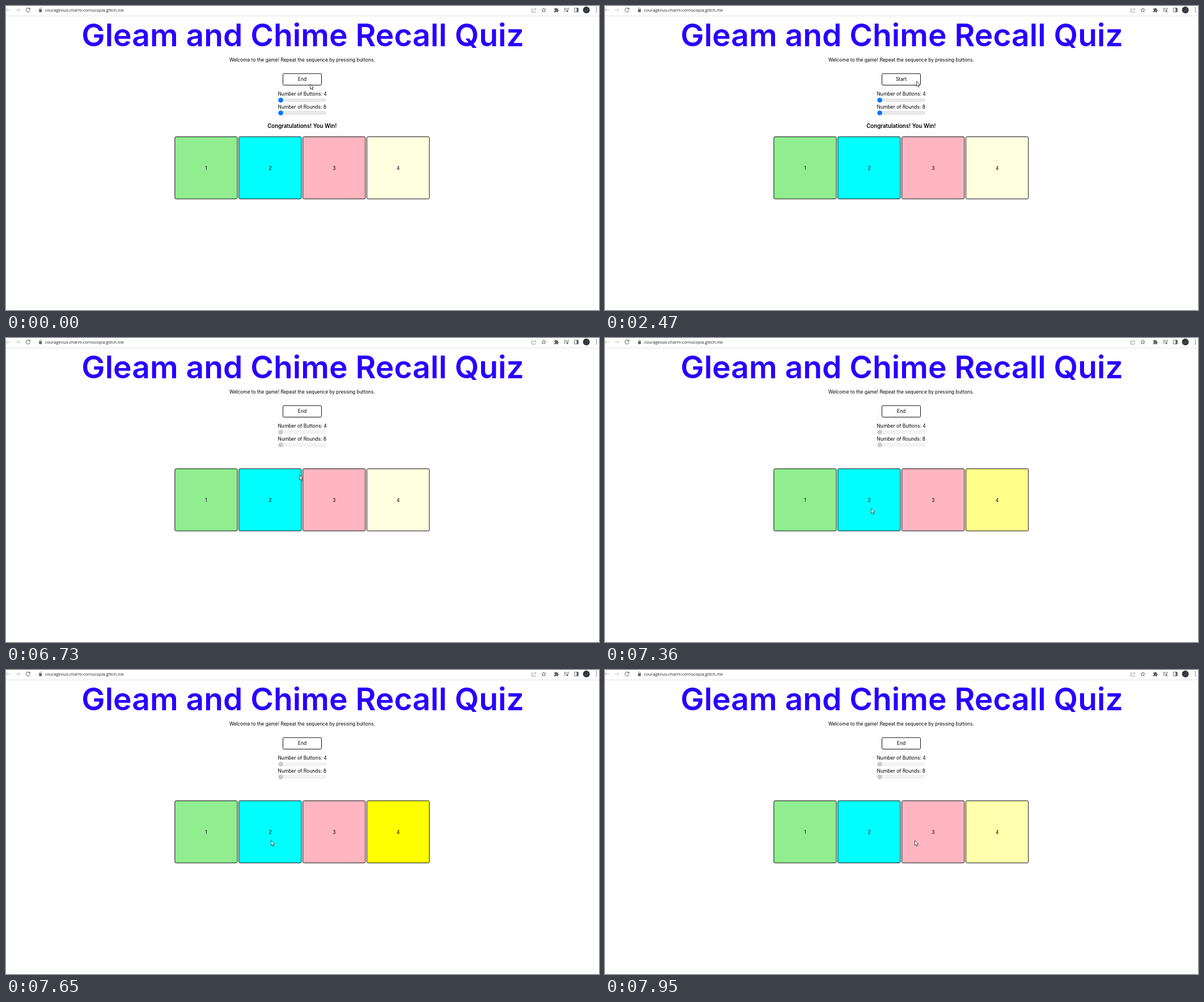
An HTML page for the animation above (8000 ms loop, 1046 by 536 pixels).

```html
<!DOCTYPE html>
<html lang="en">
<head>
<meta charset="utf-8">
<title>Memory game</title>
<style>
  html, body { margin: 0; width: 100%; height: 100%; overflow: hidden; background: #fff; }
  svg { display: block; width: 1046px; height: 536px; }
  text { font-family: Inter, "Open Sans", sans-serif; font-size: 8.5px; text-anchor: middle; }
  .title { font-size: 55.2px; font-weight: 600; fill: #2800ff; }
  .intro { font-size: 8.35px; }
  .result { font-size: 9.7px; font-weight: 600; }
  .url { font: 7.4px "Open Sans", "Noto Sans", sans-serif; text-anchor: start; fill: #222; }
  .box { stroke: #111; stroke-width: 1; }
  .icon { fill: none; stroke: #5f6368; stroke-width: .9; }
  .solid { fill: #5f6368; stroke: none; }
</style>
</head>
<body>
<svg id="stage" viewBox="0 0 1046 536">
  <defs>
    <linearGradient id="photo" x1="0" y1="0" x2="1" y2="1">
      <stop offset="0" stop-color="#1d2125"/>
      <stop offset=".55" stop-color="#3d4347"/>
      <stop offset="1" stop-color="#1d2125"/>
    </linearGradient>
  </defs>
  <rect width="1046" height="536" fill="#fff"/>
  <path d="M0 17.5H1046" stroke="#e3e3e3"/>

  <g class="icon">
    <path d="M7.5 7H0M3 3.5L-.5 7L3 10.5M17 7H24.5M21 3.5L24.5 7L21 10.5" stroke="#b9bcbf"/>
    <path d="M41.6 4.6A3.6 3.6 0 1 0 42.4 8" stroke="#444"/>
    <path class="solid" d="M42.7 2.8V6.3H39.2Z"/>
    <rect class="solid" x="58.3" y="6" width="5" height="4.7" rx=".6"/>
    <path d="M59.4 6V4.9a1.4 1.4 0 0 1 2.8 0V6" stroke-width=".8"/>
    <path d="M929.5 5H927.3V11H934V9M929.3 8.6Q929.8 5.4 933 5.2M932.3 3L935 5.3L932.3 7.6" stroke="#85898d" stroke-width=".8"/>
    <path id="star"/>
    <path class="solid" d="M967 4.5h2a1.3 1.3 0 0 1 2.6 0h2v2.2a1.3 1.3 0 0 1 0 2.6v2h-2.2a1.2 1.2 0 0 0-2.4 0H967V9a1.3 1.3 0 0 0 0-2.6Z"/>
    <path d="M984 4.2h5.5M984 6.7h5.5M984 9.2h3M991.2 9V4h2"/>
    <circle class="solid" cx="990" cy="9.2" r="1.5"/>
    <rect x="1002.5" y="3.7" width="7" height="6.8" rx=".6"/>
    <path class="solid" d="M1006.5 3.7h3v6.8h-3z"/>
    <g class="solid"><circle cx="1041.5" cy="3.5" r=".9"/><circle cx="1041.5" cy="7" r=".9"/><circle cx="1041.5" cy="10.5" r=".9"/></g>
  </g>
  <circle cx="1023.7" cy="7" r="6" fill="url(#photo)"/>
  <text class="url" x="69" y="10">courageous-charm-cornucopia.glitch.me</text>

  <text class="title" x="523.5" y="71">Gleam and Chime Recall Quiz</text>
  <text class="intro" x="522.3" y="98">Welcome to the game! Repeat the sequence by pressing buttons.</text>
  <rect class="box" x="488.5" y="119.2" width="68" height="20.3" rx="2" fill="#fff"/>
  <text id="toggle" x="522.5" y="132.2"></text>
  <text x="522.6" y="158">Number of Buttons: 4</text>
  <text x="522.3" y="180.6">Number of Rounds: 8</text>
  <g id="sliders"></g>
  <text id="result" class="result" x="522.3" y="215.3">Congratulations! You Win!</text>
  <g id="pads"></g>
  <path id="cursor" d="M.5 .5V9.6L2.6 7.7L4 10.9L5.4 10.3L4 7.2H6.6Z" fill="#fff" stroke="#222" stroke-width=".8"/>
</svg>
<script>
const LOOP = 8000;
const $ = id => document.getElementById(id);

function add(parent, tag, attrs, text = '') {
  const el = document.createElementNS('http://www.w3.org/2000/svg', tag);
  for (const k in attrs) el.setAttribute(k, attrs[k]);
  el.textContent = text;
  parent.append(el);
  return el;
}

const star = Array.from({ length: 10 }, (_, i) => {
  const r = i % 2 ? 1.7 : 4, a = i * Math.PI / 5;
  return [948.7 + r * Math.sin(a), 7.3 - r * Math.cos(a)].map(v => v.toFixed(1)).join(' ');
});
$('star').setAttribute('d', 'M' + star.join('L') + 'Z');

const sliders = [166, 188.5].map(y => ({
  y,
  track: add($('sliders'), 'rect', { x: 480.8, y: y - 2, width: 83.2, height: 4, rx: 2, 'stroke-width': .6 }),
  thumb: add($('sliders'), 'circle', { cx: 484.6, cy: y, r: 4.3 })
}));

const pads = ['#90ee90', '#00ffff', '#ffb6c1', '#ffffe0'].map((fill, i) => {
  const x = 297.9 + i * 112.9;
  const pad = add($('pads'), 'rect', { class: 'box', x, y: 230.6, width: 110.2, height: 109.5, rx: 2, fill });
  add($('pads'), 'text', { x: x + 55.2, y: 288.6 }, i + 1);
  return pad;
});

// Pointer stops: time, x, y
const stops = [
  [0, 536, 137], [20, 536, 137], [360, 545, 272], [690, 545, 272],
  [1130, 533, 181], [1689, 533, 181], [1690, 532, 181], [1720, 532, 181],
  [2470, 549, 132], [5839, 549, 132], [5840, 549, 133], [5900, 549, 133],
  [6590, 555, 214], [6630, 555, 214], [6810, 491, 259], [6940, 491, 259],
  [7360, 469, 300], [7650, 467, 300], [7745, 467, 300], [7950, 546, 300], [LOOP, 546, 300]
];

function pointer(t) {
  const i = stops.findIndex(s => s[0] > t);
  const [t0, x0, y0] = stops[i - 1], [t1, x1, y1] = stops[i];
  const p = (t - t0) / (t1 - t0), e = p * p * (3 - 2 * p);
  return [Math.round(x0 + (x1 - x0) * e), Math.round(y0 + (y1 - y0) * e)];
}

// CSS "ease": cubic-bezier(.25, .1, .25, 1)
function ease(p) {
  if (p <= 0) return 0;
  if (p >= 1) return 1;
  let lo = 0, hi = 1;
  for (let i = 0; i < 20; i++) {
    const u = (lo + hi) / 2, v = 1 - u;
    if (.75 * v * v * u + .75 * v * u * u + u ** 3 < p) lo = u; else hi = u;
  }
  return .3 * (1 - lo) ** 2 * lo + 3 * (1 - lo) * lo * lo + lo ** 3;
}

function draw(t) {
  const playing = t >= 5900;
  const [x, y] = pointer(t);
  $('cursor').setAttribute('transform', `translate(${x} ${y})`);
  $('toggle').textContent = t < 30 || playing ? 'End' : 'Start';
  $('result').style.display = playing ? 'none' : '';

  for (const s of sliders) {
    const hover = x > 479 && x < 566 && y > s.y - 17 && y < s.y + 5;
    s.track.setAttribute('fill', playing ? '#f8f8f8' : hover ? '#e5e5e5' : '#efefef');
    s.track.setAttribute('stroke', playing ? '#d0d0d0' : hover ? '#a0a0a0' : '#b2b2b2');
    s.thumb.setAttribute('fill', playing ? '#cbcbcb' : '#0075ff');
  }

  const glow = ease((t - 7265) / 400) - ease((t - 7762) / 400);
  pads[3].setAttribute('fill', `rgb(255,255,${Math.round(224 * (1 - glow))})`);
}

const start = performance.now();
function tick() {
  draw((performance.now() - start) % LOOP);
  requestAnimationFrame(tick);
}
draw(0);
requestAnimationFrame(tick);
</script>
</body>
</html>
```
